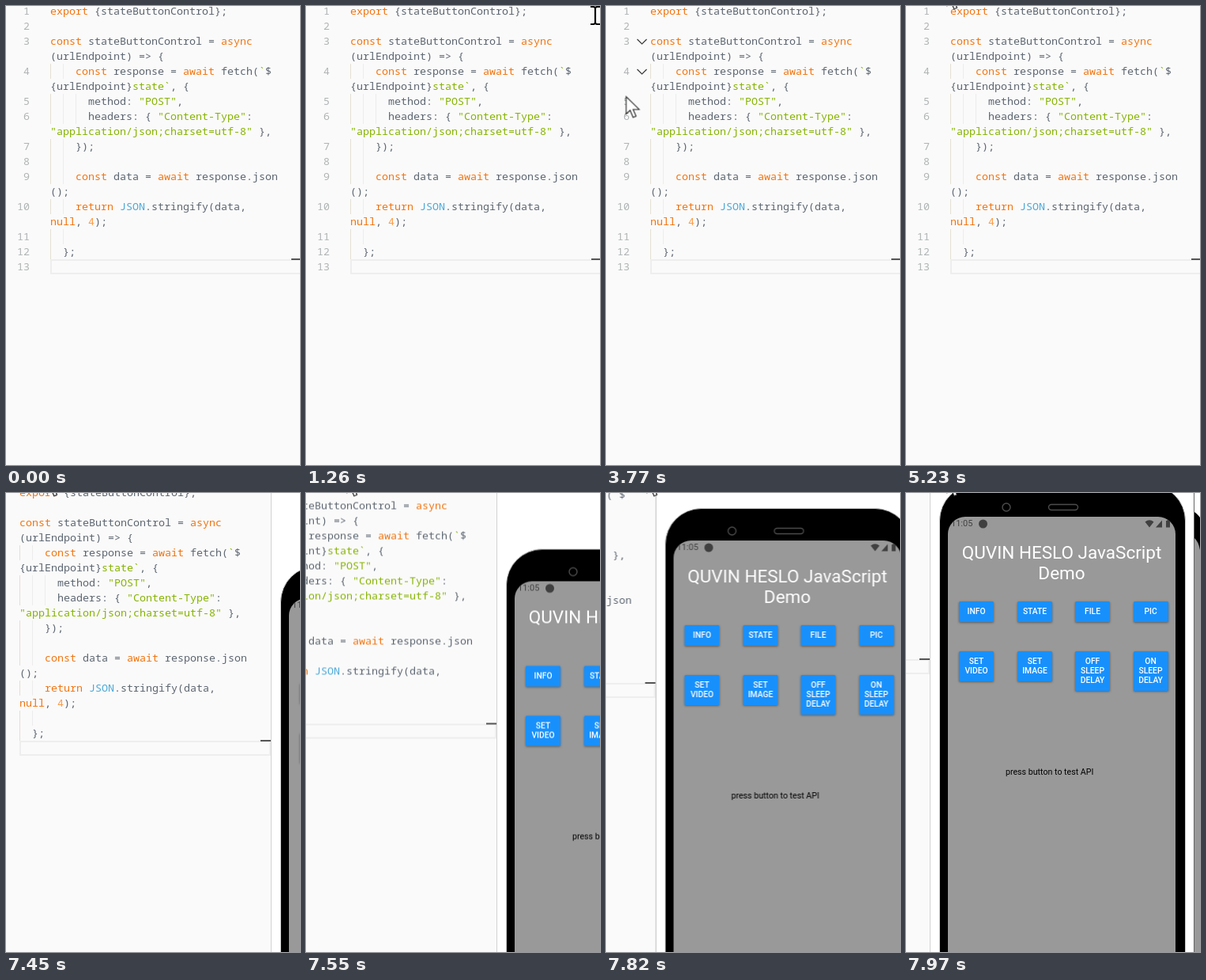
Recreate the animation shown at these times as an HTML page. Size 372x580 px, loop 8000 ms.

```html
<!DOCTYPE html>
<html lang="en">
<head>
<meta charset="utf-8">
<title>Editor and phone preview</title>
<style>
html, body { margin: 0; width: 100%; height: 100%; overflow: hidden; background: #fff; }
body { position: relative; }
body *, svg { position: absolute; box-sizing: border-box; }
body br { position: static; }
svg { left: 0; top: 0; overflow: visible; }

#world, #mouse, #tip, #word, #folds, #beam, #arrow { animation: 8s step-end infinite; }

/* editor */
#editor { left: 0; top: 0; width: 375px; height: 700px; background: #fafafa; border-right: 1px solid #d2d2d2; }
pre, #tip { margin: 0; font: 13.333px/19px "Noto Sans Mono", "DejaVu Sans Mono", monospace; color: #5c6570; white-space: pre; }
pre { top: -3px; }
pre *, #tip * { position: static; font-weight: 400; font-style: normal; }
#nums { left: 0; width: 30px; text-align: right; color: #b0b4b5; }
#code { left: 56px; }
b { color: #f2740f; }
i { color: #86b300; }
em { color: #4aa9d8; }
u { color: #ff9940; text-decoration: none; }
#line { left: 56px; top: 320px; width: 318px; height: 19px; border: 2px solid #eee; }
#mark { left: 361px; top: 319px; width: 13px; height: 2px; background: #555; }
#word { left: 136px; top: 73px; width: 64px; height: 18px; background: #e6ebf2; animation-name: word; }
#tip { left: 136px; top: 46px; width: 210px; height: 29px; padding: 5px 7px; background: #f3f4f5; border: 1px solid #dcdee0; animation-name: tip; }
#folds { animation-name: folds; }

/* phone */
#phone { left: 344px; top: 110px; font-family: Roboto, Arial, sans-serif; }
#shell { left: 42px; top: -11px; width: 312px; height: 760px; background: #000; border: 1.5px solid #c9c9c9; border-radius: 46px; }
#screen { left: 53px; top: 30px; width: 288px; height: 640px; background: #999; border-radius: 22px 22px 0 0; overflow: hidden; }
#time { left: 4px; top: 2px; font-size: 11px; line-height: 14px; color: #404040; }
#title { left: 0; top: 32px; width: 288px; text-align: center; font-size: 22.5px; line-height: 26px; color: #fff; white-space: nowrap; }
#hint { left: 73px; top: 316px; font-size: 10.65px; line-height: 14px; color: #000; white-space: nowrap; }
.btn { width: 44px; padding: 7px 0; text-align: center; font-size: 10.3px; font-weight: 500; line-height: 12px;
  color: #fff; background: #1890fc; border-radius: 1.5px; box-shadow: 0 1px 3px rgba(0,0,0,.4); }
.top { top: 107px; }
.low { top: 170px; }
.c1 { left: 14px; } .c2 { left: 88px; } .c3 { left: 161px; } .c4 { left: 234.5px; }

/* motion: percent = ms / 80 */
#world { inset: 0; animation-name: pan; }
#mouse { left: 0; top: 0; animation-name: move; }
#beam { animation-name: beam; }
#arrow { animation-name: arrow; }

@keyframes pan {
  0% { transform: translate(0, 0); }
  93.125% { transform: translate(-39px, -7px); animation-timing-function: steps(4); }
  95.625% { transform: translate(-227px, -50px); animation-timing-function: steps(2); }
  96.96% { transform: translate(-292px, -70px); animation-timing-function: steps(2); }
  98.29% { transform: translate(-331px, -90px); animation-timing-function: steps(2); }
  99.625%, 100% { transform: translate(-344px, -110px); }
}
@keyframes move {
  0% { transform: translate(-60px, -60px); }
  4.875% { transform: translate(211px, 564px); animation-timing-function: steps(4); }
  7.5% { transform: translate(262px, 300px); animation-timing-function: steps(3); }
  9.5% { transform: translate(319px, 40px); }
  10.125% { transform: translate(-60px, -60px); }
  15.125% { transform: translate(366px, 12px); animation-timing-function: steps(4); }
  17.875% { transform: translate(300px, 256px); animation-timing-function: steps(4); }
  20.625% { transform: translate(110px, 190px); animation-timing-function: steps(5); }
  24.125% { transform: translate(174px, 83.5px); }
  31% { transform: translate(174px, 83.5px); animation-timing-function: steps(5); }
  34.375% { transform: translate(80px, 92px); animation-timing-function: steps(3); }
  36.25% { transform: translate(27px, 99px); animation-timing-function: steps(4); }
  38.75% { transform: translate(34px, 80px); }
  43.75% { transform: translate(34px, 80px); animation-timing-function: steps(5); }
  47.125% { transform: translate(25.5px, 114.5px); }
  55.7% { transform: translate(25.5px, 114.5px); animation-timing-function: steps(14); }
  65.375%, 100% { transform: translate(52px, -22.5px); }
}
@keyframes beam { 0% { opacity: 1; } 35.625%, 100% { opacity: 0; } }
@keyframes arrow { 0% { opacity: 0; } 35.625%, 100% { opacity: 1; } }
@keyframes word { 0% { opacity: 0; } 28.5% { opacity: 1; } 31.625%, 100% { opacity: 0; } }
@keyframes tip {
  0% { opacity: 0; }
  28.5% { opacity: .3; animation-timing-function: steps(2); }
  29.75% { opacity: 1; }
  31.625%, 100% { opacity: 0; }
}
@keyframes folds {
  0% { opacity: 0; }
  35.625% { opacity: 0; animation-timing-function: steps(5); }
  38.75% { opacity: .9; }
  41.25% { opacity: 1; }
  61.25% { opacity: 1; animation-timing-function: steps(6); }
  65.375%, 100% { opacity: 0; }
}
</style>
</head>
<body>
<div id="world">
  <div id="editor">
    <svg width="375" height="340" fill="none">
      <path stroke="#e3e0d4" d="M56.5 73v19m0 19v38m0 19v57m0 19v19m0 19v38"/>
      <path stroke="#ececec" d="M72.5 73v19m0 19v38m0 19v57m0 19v19m0 19v19M88.5 111v38"/>
    </svg>
    <div id="line"></div>
    <div id="mark"></div>
    <div id="word"></div>
<pre id="nums">1
2
3

4

5
6

7
8
9

10

11
12
13</pre>
<pre id="code"><b>export</b> {stateButtonControl};

<b>const</b> stateButtonControl = <b>async</b>
(urlEndpoint) =&gt; {
    <b>const</b> response = <b>await</b> fetch(<i>`</i>$
{urlEndpoint}<i>state`</i>, {
      method: <i>"POST"</i>,
      headers: { <i>"Content-Type"</i>:
<i>"application/json;charset=utf-8"</i> },
    });

    <b>const</b> data = <b>await</b> response.json
();
    <b>return</b> <em>JSON</em>.stringify(data,
<b>null</b>, <u>4</u>);

  };
</pre>
    <svg id="folds" width="60" height="100" fill="none" stroke="#383838" stroke-width="1.2">
      <path d="M39.500 42l6 6 6-6M39.500 80l6 6 6-6"/>
    </svg>
    <div id="tip"><b>const</b> response: <em>Response</em></div>
  </div>

  <div id="phone">
    <svg width="400" height="700">
      <path fill="#000" d="M365 24Q371 28 375 36V700H365Z"/>
      <path fill="#999" d="M365 57Q370 61 372 72V700H365Z"/>
      <path stroke="#666" d="M364.5-120V700"/>
    </svg>
    <div id="shell"></div>
    <svg width="360" height="30" fill="none" stroke="#4c4c4c" stroke-width="1.4">
      <circle cx="127" cy="18" r="5"/>
      <rect x="180.5" y="14.5" width="37" height="7" rx="3.5"/>
    </svg>
    <div id="screen">
      <div id="time">11:05</div>
      <svg width="288" height="20" fill="#404040">
        <circle cx="44.5" cy="9" r="5.5"/>
        <path d="M249.500 6.500q5.500-4.500 11 0l-5.500 7zM263 13.500h8v-9zM276 5h1.500v-1h2v1h1.500v8.500h-5z"/>
      </svg>
      <div id="title">QUVIN HESLO JavaScript<br>Demo</div>
      <div class="btn top c1">INFO</div>
      <div class="btn top c2">STATE</div>
      <div class="btn top c3">FILE</div>
      <div class="btn top c4">PIC</div>
      <div class="btn low c1">SET<br>VIDEO</div>
      <div class="btn low c2">SET<br>IMAGE</div>
      <div class="btn low c3">OFF<br>SLEEP<br>DELAY</div>
      <div class="btn low c4">ON<br>SLEEP<br>DELAY</div>
      <div id="hint">press button to test API</div>
    </div>
  </div>
</div>

<div id="mouse">
  <svg id="beam" width="20" height="30" fill="none">
    <path d="M-6-11H-2L0-10L2-11H6M0-10V10M-6 11H-2L0 10L2 11H6" stroke="#fff" stroke-width="4"/>
    <path d="M-6-11H-2L0-10L2-11H6M0-10V10M-6 11H-2L0 10L2 11H6" stroke="#000" stroke-width="2.2"/>
  </svg>
  <svg id="arrow" width="20" height="30" fill="#fff" stroke="#1a1a1a" stroke-width="1.1">
    <path d="M0 0V22L5 17.300L8.800 26.300L12.600 24.700L8.800 16.200H16.500Z"/>
  </svg>
</div>
</body>
</html>
```
